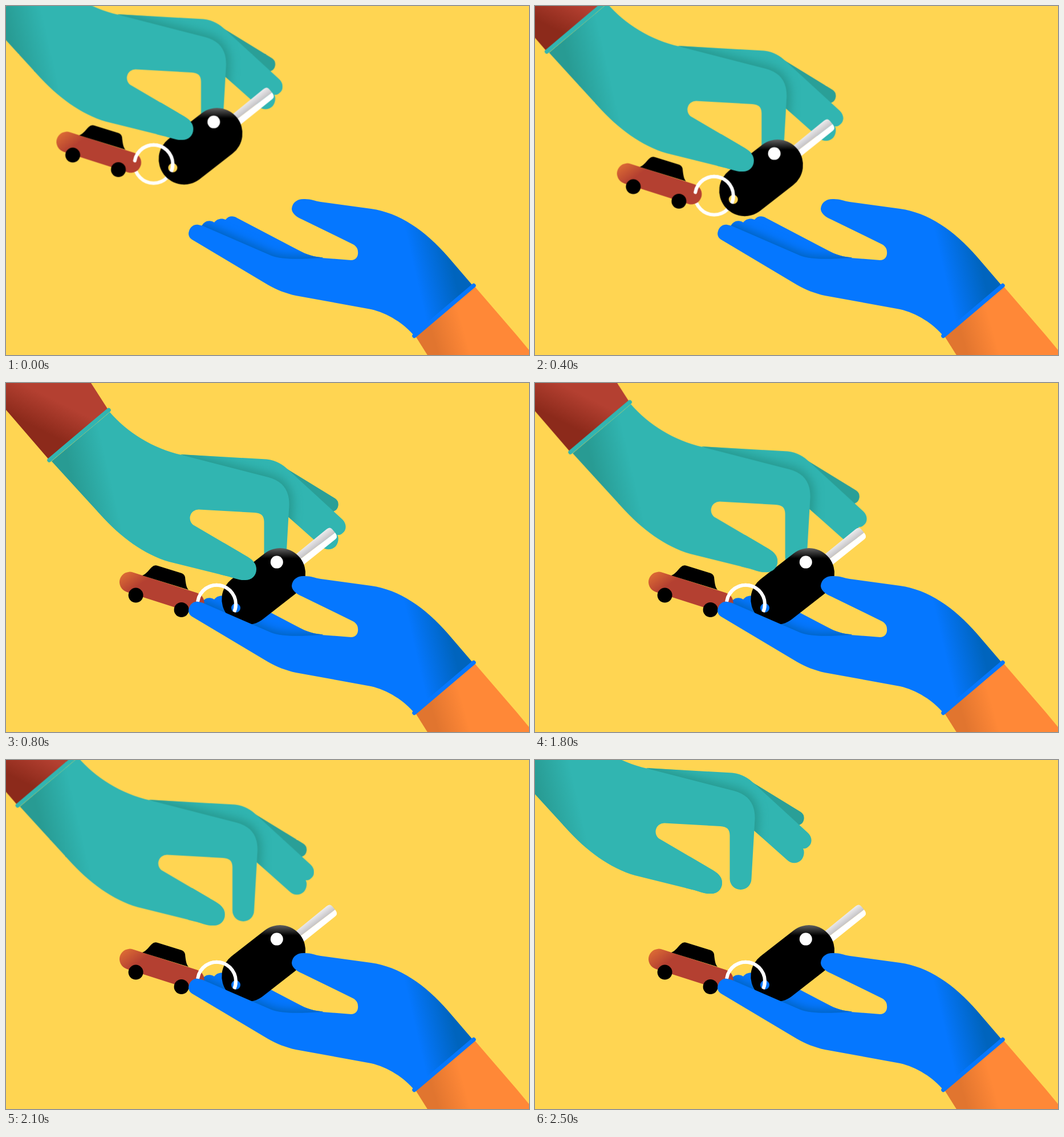
An HTML page without scripts that plays this animation: 917x611 px, repeating every 4500 ms.

```html
<!DOCTYPE html>
<html lang="en">
<head>
<meta charset="utf-8">
<title>Handing over the car key</title>
<style>
  html, body { margin: 0; width: 100%; height: 100%; overflow: hidden; background: #ffd552; }
  svg { display: block; width: 100%; height: 100%; }
  .hand, .key { animation: give 4.5s -1ms infinite steps(8, end); }
  .hand { animation-name: give-and-return; }

  /* eight even steps down, a pause, eight even steps back */
  @keyframes give-and-return {
    0% { transform: translate(-110.6px, -110.6px); }
    17.7778%, 37.7778% { transform: none; }
    55.5556%, 100% { transform: translate(-111px, -111px); }
  }
  @keyframes give {
    0% { transform: translate(-110.6px, -110.6px); }
    17.7778%, 100% { transform: none; }
  }
</style>
</head>
<body>
<svg viewBox="0 0 917 611" preserveAspectRatio="none">
  <defs>
    <linearGradient id="teal" gradientUnits="userSpaceOnUse" x1="112" y1="155" x2="177" y2="140">
      <stop offset="0" stop-color="#289b93"/><stop offset="1" stop-color="#31b5b1"/>
    </linearGradient>
    <linearGradient id="blue" gradientUnits="userSpaceOnUse" x1="786" y1="469" x2="721" y2="484">
      <stop offset="0" stop-color="#0064bd"/><stop offset="1" stop-color="#0577ff"/>
    </linearGradient>
    <linearGradient id="redArm" gradientUnits="userSpaceOnUse" x1="88" y1="31" x2="62" y2="83">
      <stop offset="0" stop-color="#b44031"/><stop offset="1" stop-color="#8c2a1b"/>
    </linearGradient>
    <linearGradient id="orangeArm" gradientUnits="userSpaceOnUse" x1="752" y1="590" x2="805" y2="575">
      <stop offset="0" stop-color="#e1752f"/><stop offset="1" stop-color="#ff8837"/>
    </linearGradient>
    <linearGradient id="carRed" gradientUnits="userSpaceOnUse" x1="205" y1="332" x2="225" y2="360">
      <stop offset="0" stop-color="#de6d35"/><stop offset="1" stop-color="#b44031"/>
    </linearGradient>
    <linearGradient id="fob" gradientUnits="userSpaceOnUse" x1="0" y1="288" x2="0" y2="307">
      <stop offset="0" stop-color="#666"/><stop offset="1" stop-color="#000"/>
    </linearGradient>
    <linearGradient id="steel" gradientUnits="userSpaceOnUse" x1="535" y1="276" x2="544" y2="288">
      <stop offset="0" stop-color="#eeedef"/><stop offset="1" stop-color="#c3c1c4"/>
    </linearGradient>
    <filter id="soft" filterUnits="userSpaceOnUse" x="0" y="0" width="917" height="611" color-interpolation-filters="sRGB">
      <feGaussianBlur stdDeviation="8"/>
    </filter>

    <path id="giver" d="M80 137 L182 51 C212 86 258 115 308 126 L460 165 C487 172 497 190 496.500 214
      L490.500 319 A19 19 0 0 1 452.500 319 V243 C452.500 232 447 227.500 436 227 L338 221.500
      A15 15 0 0 0 331 250 L423 304 C435 311 439 318 439 326 C439 338 430 345 420 345
      C408 346 397 340 387 338 L286 313 C242 300 202 271 165 230 Z"/>
    <path id="giverFingers" d="M306 125 L457 133.600 C475 136 485 143 495 152 L590 239
      C598 247 597 258 590 263 C587 266 584 266 581 266 C584 271 583 280 578 286
      C571 293 560 293 553 286 L490 230 L470 190 Z"/>
    <path id="taker" d="M337 383 Q345 384 352 388 L465 437 C485 445 520 443 553 441 L605 445
      C614 445 618 438 617 430 C617 424 613 419 606 416 L520 374 C508 369 501 362 501 355
      C502 343 512 337 524 338 C535 338 540 341 552 343 L640 355 C690 362 735 393 775 439
      L818 489 L716 578 C700 557 668 537 640 531 L508 507 C490 503 475 497 459 488
      L328 410 C320 406 319 399 321 394 C323 387 329 382 337 383 Z"/>
    <path id="takerFingers" d="M343 386 C347 376 358 374 365 379 C370 372 379 371 385 374
      C390 367 399 367 405 371 L512 427 C528 436 540 439 556 440.500 L530 450 L465 445 L345 392 Z"/>
    <circle id="ring" cx="369.400" cy="387.200" r="33.500" fill="none" stroke="#fff" stroke-width="6" stroke-linecap="round"/>

    <clipPath id="onGiver"><use href="#giverFingers"/></clipPath>
    <clipPath id="onTaker"><use href="#takerFingers"/></clipPath>
    <clipPath id="thumb"><rect x="375" y="280" width="71" height="80"/></clipPath>
  </defs>

  <rect width="917" height="611" fill="#ffd552"/>

  <!-- receiving fingers, behind the key -->
  <use href="#takerFingers" fill="#0577ff"/>
  <g clip-path="url(#onTaker)">
    <use href="#taker" fill="#0062bd" stroke="#0062bd" stroke-width="10" filter="url(#soft)"/>
  </g>

  <g class="hand">
    <path d="M178 45 L149 0 L110 -60 H-95 L0 47 L76 135 Z" fill="url(#redArm)"/>
    <path d="M488 147.500 L577 202 A13 13 0 0 1 574 225 L560 235 L490 170 Z" fill="#2a9f97"/>
    <use href="#giverFingers" fill="#31b5b1"/>
    <g clip-path="url(#onGiver)">
      <use href="#giver" fill="#279990" stroke="#279990" stroke-width="14" filter="url(#soft)"/>
    </g>
    <use href="#giver" fill="url(#teal)"/>
    <path d="M76 135 L180 47.500" stroke="#31b5b1" stroke-width="7.500" stroke-linecap="round"/>
  </g>

  <g class="key">
    <use href="#ring"/>
    <path d="M217 348.600 L329.600 384.600" stroke="url(#carRed)" stroke-width="36" stroke-linecap="round"/>
    <path d="M239 337 C248 333 250 327 256 322 Q260 318 266 320 L308 333 Q313 335 314 340 C315 350 316 358 320 362 Z"/>
    <circle cx="227.600" cy="371.600" r="13"/>
    <circle cx="307.600" cy="397" r="13"/>
    <path d="M508 300 L562 256 Q568 251 572 256 L577 262 L514 310 Z" fill="url(#steel)"/>
    <path d="M514 310 L577 262 L579 265 Q582 270 577 274 L522 318 Z" fill="#fff"/>
    <path fill="url(#fob)" fill-rule="evenodd" d="M395.500 343.400 L453.300 298.400 A44.500 44.500 0 0 1 507.900 368.800
      L450.100 413.800 A44.500 44.500 0 0 1 395.500 343.400 Z M395 393.800 a8 8 0 1 0 16 0 a8 8 0 1 0 -16 0 Z"/>
    <circle cx="474.800" cy="313.600" r="11" fill="#fff"/>
    <use href="#ring" stroke-dasharray="109.300 200" transform="rotate(190 369.400 387.200)"/>
  </g>

  <g class="hand">
    <use href="#giver" fill="url(#teal)" clip-path="url(#thumb)"/>
  </g>

  <!-- receiving palm and thumb, in front of the key -->
  <path d="M718 578 L747 624 L790 690 H990 L896 577 L820 489 Z" fill="url(#orangeArm)"/>
  <use href="#taker" fill="url(#blue)"/>
  <path d="M716 577.500 L820 489.500" stroke="#0577ff" stroke-width="7.500" stroke-linecap="round"/>
</svg>
</body>
</html>
```
